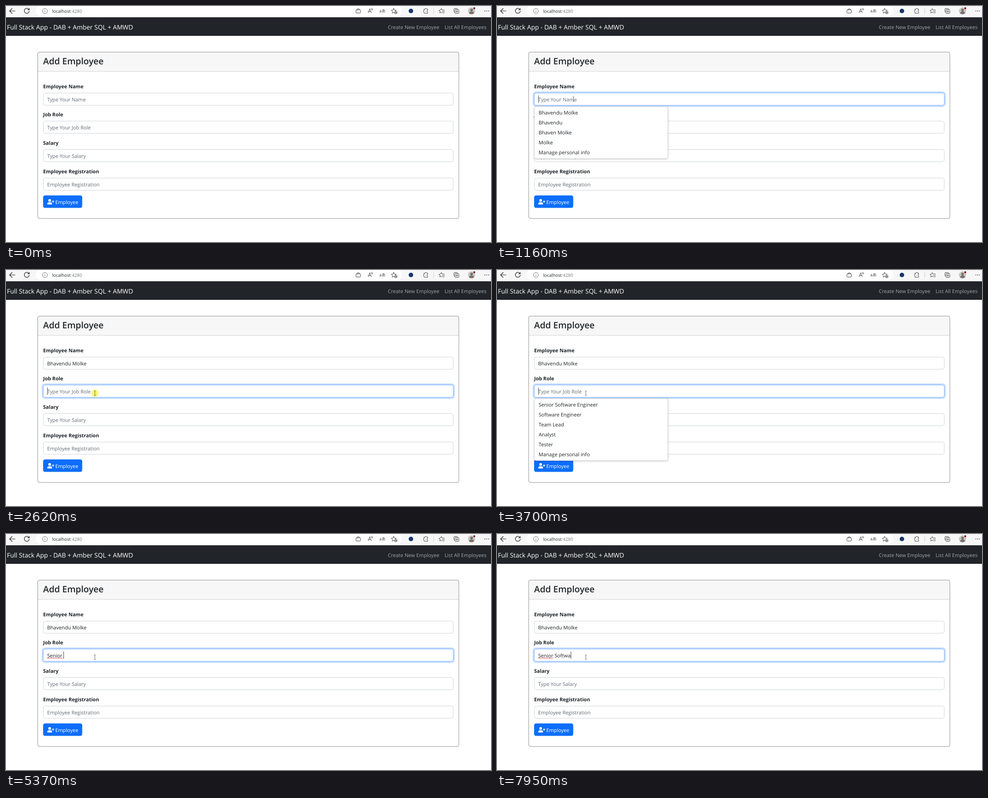
An HTML page that plays this animation: 1072 px wide and 522 px high, repeating every 8 s.

```html
<!DOCTYPE html>
<html lang="en">
<head>
<meta charset="utf-8">
<title>Add Employee</title>
<style>
  html, body { margin: 0; width: 100%; height: 100%; overflow: hidden; background: #fff; }
  svg { display: block; }
  text { font-family: "Open Sans", "Noto Sans", sans-serif; font-size: 11.15px; fill: #212529;
         white-space: pre; text-rendering: geometricPrecision; }
  .label { font-size: 11.05px; font-weight: 700; }
  .hint { fill: #636b72; }
  .link { fill: #a3a5a8; }
  .url { font-size: 9.8px; }
  .icon { fill: none; stroke: #444; stroke-width: 1; stroke-linecap: round; stroke-linejoin: round; }
  .box { fill: #fff; stroke: #ced4da; }
  .focus .box { stroke: #86b7fe; }
  .ring { fill: none; stroke: #c2dbfe; stroke-width: 3; visibility: hidden; }
  .focus .ring { visibility: visible; }
  .squiggle { fill: none; stroke: #e0303a; stroke-width: 1.2; stroke-dasharray: 1.5 .7; }
  .menu rect { fill: #fff; stroke: #d4d4d4; filter: drop-shadow(0 1px 2px #0003); }
</style>
</head>
<body>
<svg width="1072" height="522" viewBox="0 0 1072 522">
  <rect width="1072" height="26" fill="#f7f7f7"/>
  <rect x="66" y="-2" width="809" height="25" rx="12" fill="#fff"/>
  <g class="icon">
    <path d="M20 11H8.5M13.5 5.5L8 11l5.5 5.5M50.5 7.5A5.5 5.5 0 1 0 51.5 11M51.3 5v3.3h-3.3" stroke="#222" stroke-width="1.2"/>
    <circle cx="86" cy="11" r="5.5" stroke="#777"/>
    <path d="M86 10.5v3M86 8v.2" stroke="#666"/>
    <rect x="773.5" y="8.5" width="10" height="7" rx="1.5"/>
    <path d="M776 8.5V6.5h5v2"/>
    <path d="M800.5 15l3.5-9 3.5 9M801.7 12h4.6M807 6q1.5 1 1.5 3M808.5 4.500q2 1.500 2 4"/>
    <path d="M857 5.5l1.7 3.4 3.8.5-2.8 2.6.7 3.8-3.4-1.8-3.4 1.8.7-3.8-2.8-2.6 3.8-.5z"/>
    <circle cx="861.5" cy="14.5" r="3" fill="#fff"/>
    <path d="M860 14.5h3M861.5 13v3"/>
    <path d="M924 7h2.2a1.7 1.7 0 1 1 3.4 0H932v3a1.6 1.6 0 1 0 0 3.2V16h-8v-2.8a1.6 1.6 0 1 1 0-3.2z"/>
    <path d="M945.5 5v12" stroke="#ccc"/>
    <path d="M964 15l-2-1.200-3.200 1.700.6-3.600-2.600-2.500 3.600-.5L962 5.600l1.600 3.300h5.400M964.500 12h4.500M965.500 15h3.500"/>
    <rect x="990" y="5.5" width="8" height="8" rx="1.5"/>
    <rect x="992.5" y="8" width="8.5" height="8.5" rx="1.5" fill="#f7f7f7"/>
    <path d="M996.75 10v4.5M994.5 12.25h4.5"/>
  </g>
  <text x="825" y="14" style="font:9px 'Noto Sans CJK JP','Noto Sans CJK',sans-serif;fill:#444">aあ</text>
  <circle cx="895" cy="11" r="5" fill="#17376f"/>
  <circle cx="1029" cy="11" r="8" fill="#c9c6c4"/>
  <circle cx="1029" cy="9" r="3" fill="#77716d"/>
  <path d="M1023.5 16a5.5 4 0 0 1 11 0q-5.5 4-11 0z" fill="#77716d"/>
  <circle cx="1035" cy="5" r="2.3" fill="#8e2222"/>
  <path d="M1058.5 11h.01M1062.5 11h.01M1066.5 11h.01" stroke="#333" stroke-width="1.8" stroke-linecap="round"/>
  <text class="url" x="102" y="14.5">localhost<tspan fill="#777">:4280</tspan></text>

  <rect y="25" width="1072" height="41" fill="#212529"/>
  <text x="2" y="52" style="font-size:14px;fill:#fff">Full Stack App - DAB + Amber SQL + AMWD</text>
  <text class="link" x="844" y="51">Create New Employee</text>
  <text class="link" x="969.5" y="51">List All Employees</text>

  <path d="M70 145V106a4 4 0 0 1 4-4H997a4 4 0 0 1 4 4V145z" fill="#f7f7f7"/>
  <path d="M70 144.5H1001" stroke="#d3d3d3"/>
  <rect x="70" y="102" width="931" height="368" rx="4" fill="none" stroke="#8c8d8f"/>
  <text x="82" y="129" style="font-size:19.5px;font-weight:600">Add Employee</text>

  <g id="form"></g>

  <rect x="82" y="419" width="86.5" height="27.5" rx="4.4" fill="#0d6efd"/>
  <g fill="#fff">
    <circle cx="96.5" cy="430" r="3"/>
    <path d="M91.3 439v-1a4 4 0 0 1 4-4h2.4a4 4 0 0 1 4 4v1z"/>
    <path d="M101.5 432.5h5M104 430v5" stroke="#fff" stroke-width="1.3"/>
  </g>
  <text x="109" y="437.7" style="fill:#fff">Employee</text>

  <g id="menus"></g>
  <circle id="halo" r="8.2" fill="#fbf04c" opacity=".75"/>
  <path id="caret" stroke="#444" d="M.5 0v16"/>
  <path id="beam" d="M-2-5h1.5l.5.5.5-.5H2M0-4.5v9M-2 5h1.5l.5-.5.5.5H2" fill="none" stroke="#444" stroke-width=".8"/>
  <path id="arrow" d="M0 0v12.5l3-2.7 2 4.7 2-.9-2-4.5h4z" fill="#fff" stroke="#222" stroke-width=".8"/>
</svg>
<script>
const LOOP = 8000, NAME = "Bhavendu Molke", ROLE = "Senior Softwa";
const KEY_TIMES = [4230, 4560, 4760, 5030, 5100, 5170, 5370, 7090, 7350, 7420, 7610, 7810, 7950];
const CARET_OFF = [[0, 1030], [1560, 1760], [2290, 2620], [3180, 3700], [5900, 6360], [6950, 7090]];
// Pointer stops on the way from the first field to the second: time, x, y.
const HOPS = [[2020, 173, 210], [2090, 188, 222], [2160, 205, 239], [2220, 208, 254], [2290, 200, 268], [2360, 196.5, 272.5]];
const FIELDS = [
  ["Employee Name", "Type Your Name"],
  ["Job Role", "Type Your Job Role"],
  ["Salary", "Type Your Salary"],
  ["Employee Registration", "Employee Registration"]
];
const LISTS = [
  [222, [NAME, "Bhavendu", "Bhaven Molke", "Molke", "Manage personal info"]],
  [284, ["Senior Software Engineer", "Software Engineer", "Team Lead", "Analyst", "Tester", "Manage personal info"]]
];
const TOP = 192.5;
const rowOffset = i => Math.floor(i * 62.67);

const $ = id => document.getElementById(id);
const within = (t, from, to) => t >= from && t < to;
const show = (el, on) => el.setAttribute("visibility", on ? "visible" : "hidden");
const place = (el, x, y) => el.setAttribute("transform", `translate(${x} ${y})`);

const pen = document.createElement("canvas").getContext("2d");
const widthOf = s => {
  pen.font = '11.15px "Open Sans", "Noto Sans", sans-serif';
  return pen.measureText(s).width;
};

$("form").innerHTML = FIELDS.map(([label, hint], i) => `
  <g transform="translate(0 ${rowOffset(i)})">
    <text class="label" x="82" y="182">${label}</text>
    <rect class="ring" x="80.5" y="${TOP - 2}" width="910" height="31" rx="6"/>
    <rect class="box" x="82.5" y="${TOP}" width="906" height="27" rx="4"/>
    <text class="value hint" x="91" y="210.7">${hint}</text>
    <path class="squiggle"/>
  </g>`).join("");
const rows = [...$("form").children];

$("menus").innerHTML = LISTS.map(([y, items]) => `
  <g class="menu" transform="translate(82 ${y})">
    <rect x=".5" y=".5" width="295" height="${items.length * 22 + 5}" rx="4"/>
    ${items.map((s, i) => `<text x="10" y="${18 + i * 22}">${s}</text>`).join("")}
  </g>`).join("");
const menus = [...$("menus").children];

function setField(i, value, focused, misspelt) {
  const text = rows[i].querySelector(".value");
  rows[i].classList.toggle("focus", focused);
  text.classList.toggle("hint", !value);
  text.textContent = value || FIELDS[i][1];
  let d = "", x = 91;
  for (const word of misspelt.split(" ")) {
    d += `M${x} 212.7h${widthOf(word)}`;
    x += widthOf(word + " ");
  }
  rows[i].querySelector(".squiggle").setAttribute("d", d);
}

function pointer(t) {
  if (t >= HOPS[0][0]) return HOPS.filter(h => t >= h[0]).pop().slice(1);
  const step = Math.min(11, Math.floor((t - 70) / 70));
  const left = (1 - step / 11) ** 2;
  return [169 + 800 * left, 206 + 251 * left];
}

function draw(t) {
  const name = t >= 1760 ? NAME : "";
  const role = ROLE.slice(0, KEY_TIMES.filter(k => t >= k).length);
  const onName = within(t, 1030, 2620), onRole = t >= 2620;
  setField(0, name, onName, onName ? name : "");
  setField(1, role, onRole, t >= 5370 ? "Senior" : "");

  show($("caret"), !CARET_OFF.some(([a, b]) => within(t, a, b)));
  place($("caret"), 91 + Math.round(widthOf(onRole ? role : name)), 198 + rowOffset(+onRole));

  show(menus[0], within(t, 1100, 1760));
  menus[0].setAttribute("opacity", t < 1160 ? .6 : 1);
  show(menus[1], within(t, 2780, 4440));
  menus[1].setAttribute("opacity", t < 4230 ? 1 : t < 4340 ? .6 : .15);

  const [x, y] = pointer(t);
  const overInput = rows.some((_, i) => within(y - TOP - rowOffset(i), 0, 27));
  show($("beam"), t >= 70 && overInput);
  show($("arrow"), t >= 70 && !overInput);
  show($("halo"), within(t, 1030, 1160) || within(t, 2620, 2780));
  for (const id of ["beam", "arrow", "halo"]) place($(id), x, y);
}

const start = performance.now();
(function tick() {
  draw((performance.now() - start) % LOOP);
  requestAnimationFrame(tick);
})();
</script>
</body>
</html>
```
